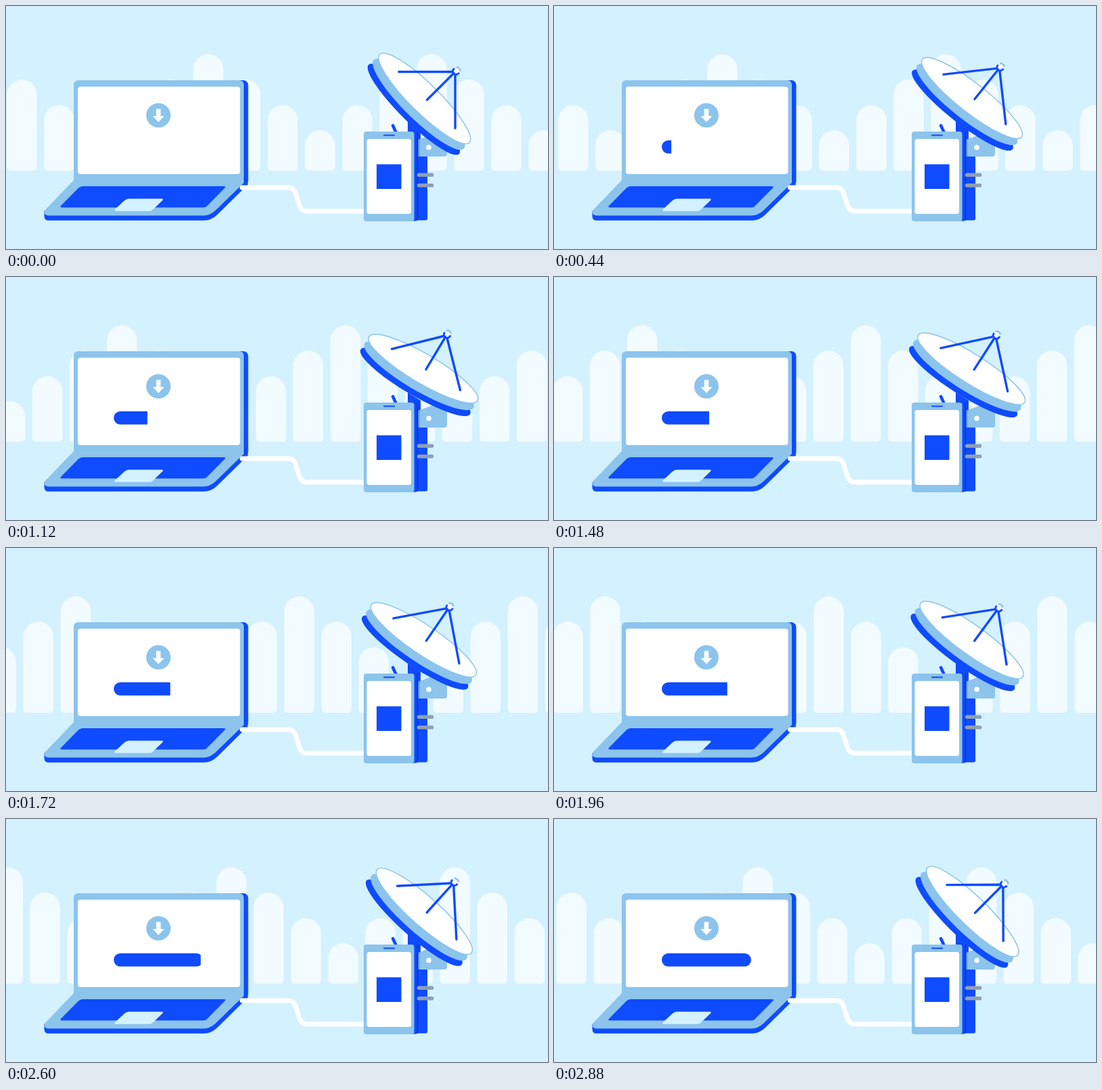
These frames come from a looping animation (800x360 px, 2.92 s). An HTML page:

```html
<!DOCTYPE html>
<html lang="en">
<head>
<meta charset="utf-8">
<title>Download</title>
<style>
  html, body { margin: 0; width: 100%; height: 100%; overflow: hidden; background: #d4f1ff; }
  svg { display: block; width: 800px; height: 360px; }
  .blue { fill: #0f4bff; }
  .sky { fill: #8cc4ec; }
  .pale { fill: #d4f1ff; }
  .white { fill: #fff; }
  .line { fill: none; stroke: #0f4bff; stroke-width: 3.4; stroke-linecap: round; }
</style>
</head>
<body>
<svg viewBox="0 0 800 360">
  <clipPath id="clip"><rect id="reveal" x="150" y="190" width="0" height="40"/></clipPath>

  <g id="bars" fill="#f2fbff"></g>

  <!-- laptop -->
  <rect class="blue" x="120" y="110" width="237.5" height="156" rx="7"/>
  <path class="blue" d="M100 262L351 256L357.5 264L312 309Q303 317.7 292 317.7H62Q56.500 317.700 56.500 311V304Z"/>
  <path class="sky" d="M107 110H344Q351 110 351 117V262L309 303Q301 310.500 291 310.500H62Q54 309 58 302L100 258V117Q100 110 107 110Z"/>
  <rect class="white" x="106" y="119.500" width="239.500" height="129.500" rx="4"/>
  <path class="blue" d="M113 267H322Q325 267.500 323 269.500L297 296Q295 298.500 291 298.500H82Q79 298 81 296L107 269.500Q109.500 267 113 267Z"/>
  <path class="pale" d="M181 285.500H230Q233 286 231 288L217 301.500Q215 303.700 212 303.700H162Q159 303 161 301L175 288Q178 285.500 181 285.500Z"/>
  <circle class="sky" cx="225" cy="162" r="18"/>
  <path class="white" d="M221.700 152.500H228.300V163H233.500L225 172L216.500 163H221.700Z"/>
  <rect class="blue" x="159" y="199" width="132" height="19.500" rx="9.750" clip-path="url(#clip)"/>

  <path d="M348.500 269H417Q424 269 427 276L433 295Q436 304 444 304H530" fill="none" stroke="#fff" stroke-width="7" stroke-linecap="round"/>

  <!-- stand -->
  <path class="line" style="stroke-width:4.500" d="M571 177L576 188"/>
  <path class="blue" d="M593 171L612 183V215H622V315Q622 317.500 619 317.500H593Z"/>
  <path class="sky" d="M606 199L640 186H651V219Q651 223 647 223H606Z"/>
  <path fill="#72a9e5" d="M606 199L611 197V223H606Z"/>
  <circle class="white" cx="624" cy="209.500" r="3.800"/>

  <g id="dish">
    <g transform="translate(617.800 137) rotate(44.700)">
      <ellipse class="blue" cy="22.600" rx="94" ry="19.500"/>
      <ellipse class="sky" cy="12" rx="93.500" ry="21.500"/>
      <ellipse class="white" rx="93" ry="21.500" stroke="#8cc4ec" stroke-width="1.500"/>
    </g>
    <path class="line" d="M580 97.500H662M663 98V181M663 97.500L621.500 139"/>
    <ellipse class="sky" cx="668" cy="93" rx="4.500" ry="2.200" transform="rotate(45 668 93)"/>
    <circle class="white" cx="664.500" cy="96.500" r="4.600"/>
    <path class="line" style="stroke-width:2.800;stroke-linecap:butt" d="M662 92.500Q657 96 662 100.500Q665 103 669 99"/>
  </g>

  <!-- phone -->
  <rect x="600" y="186" width="8.500" height="131.500" fill="#0b3cd6"/>
  <rect class="blue" x="600" y="186" width="6" height="132.500"/>
  <rect class="sky" x="528" y="186" width="74.500" height="133" rx="4"/>
  <rect class="white" x="532.500" y="197" width="65.500" height="111" rx="3.500"/>
  <path class="line" style="stroke-width:2" d="M558 191.500H573"/>
  <rect class="blue" x="547" y="234.500" width="36.500" height="36.500"/>
  <path d="M609.500 250.200H628.500M609.500 265.800H628.500" stroke="#8fa0b2" stroke-width="5.600" stroke-linecap="round"/>
</svg>
<script>
const LOOP = 2920, STEP = 40, CYCLE = 2900;
const GAP = 55, TOPS = [71.5, 109, 147, 184, 147, 109];
const get = id => document.getElementById(id);
const bars = get('bars'), dish = get('dish'), reveal = get('reveal');

// rows of rounded columns, repeating every six
let shapes = '';
for (let i = -6; i < 17; i++) {
  const x = 276.3 + i * GAP, top = TOPS[(i + 6) % 6] + 22.2;
  shapes += `<path d="M${x} ${top}a22.2 22.2 0 0 1 44.4 0V238q0 6 -6 6h-32.4q-6 0 -6 -6Z"/>`;
}
bars.innerHTML = shapes;

// cubic-bezier(.167, 0, .833, 1)
function ease(u) {
  let lo = 0, hi = 1, s;
  for (let i = 0; i < 24; i++) {
    s = (lo + hi) / 2;
    const r = 1 - s;
    const x = 3 * s * r * r * .167 + 3 * s * s * r * .833 + s ** 3;
    if (x < u) lo = s; else hi = s;
  }
  return s * s * (3 - 2 * s);
}

// quick tilt back, slower return
function tilt(t) {
  const peak = 1040, max = 14.3;
  return t < peak
    ? max * (1 - (1 - t / peak) ** 1.1)
    : max * (1 - ((t - peak) / (CYCLE - peak)) ** 1.35);
}

function draw() {
  const t = Math.floor(performance.now() % LOOP / STEP) * STEP;
  bars.setAttribute('transform', `translate(${-6 * GAP * t / CYCLE} 0)`);
  dish.setAttribute('transform', `rotate(${-tilt(t)} 612 144.4)`);
  reveal.setAttribute('width', 9 + 136.5 * ease(t / CYCLE));
  requestAnimationFrame(draw);
}
draw();
</script>
</body>
</html>
```
